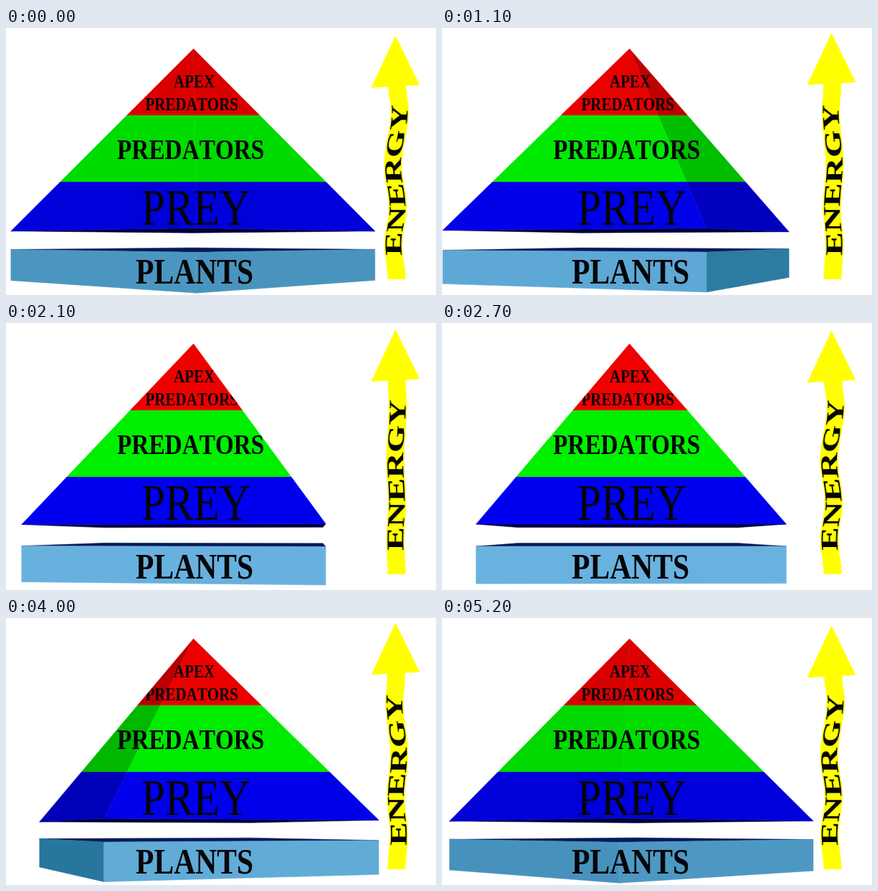
Recreate the animation shown at these times as an HTML page with a canvas. Size 600 px wide and 373 px high, loop 5.3 s.

```html
<!DOCTYPE html>
<html lang="en">
<head>
<meta charset="utf-8">
<title>Energy pyramid</title>
<style>
  html, body { margin: 0; overflow: hidden; background: #fff; }
  canvas { display: block; }
</style>
</head>
<body>
<canvas id="stage" width="600" height="373"></canvas>
<script>
const LOOP = 5300, STEP = 100;
const CX = 261.6, HORIZON = 297, RADIUS = 254, DISTANCE = 1055;
const APEX = [CX, 29];
const BANDS = [[0, 122, [1, 0, 0]], [122, 215, [0, 1, 0]], [215, 373, [0, 0, 1]]];
// Turning points of the arrow shaft's bend: height, offset
const BEND = [[84, 1], [114, 4.5], [192, -5], [250, 1.5], [302, -4.5], [351, 0]];

const ctx = document.getElementById('stage').getContext('2d');
const shaft = document.createElement('canvas');
shaft.width = 600;
shaft.height = 373;

const rgb = parts => `rgb(${parts.map(Math.round)})`;

function fillPolygon(points, colour) {
  const path = new Path2D();
  points.forEach(([x, y]) => path.lineTo(x, y));
  path.closePath();
  ctx.fillStyle = ctx.strokeStyle = colour;
  ctx.lineWidth = 0.5;
  ctx.fill(path);
  ctx.stroke(path);
  return path;
}

function label(c, text, x, y, size, { weight = 'bold', tall = 1.2, angle = 0 } = {}) {
  c.save();
  c.translate(x, y);
  c.rotate(angle);
  c.scale(1, tall);
  c.font = `${weight} ${size}px "Liberation Serif", serif`;
  c.fontKerning = 'none';
  c.fillStyle = '#050508';
  c.fillText(text, 0, 0);
  c.restore();
}

function drawShaft() {
  const c = shaft.getContext('2d');
  c.fillStyle = '#ff0';
  c.fillRect(532.5, 60, 25, 291);
  label(c, 'ENERGY', 556, 318, 49.3, { tall: 0.68, angle: -Math.PI / 2 });
}

// Perspective view of a square's corners at a height below the horizon
function square(turn, height) {
  return [0, 1, 2, 3].map(i => {
    const a = turn + i * Math.PI / 2;
    const zoom = DISTANCE / (DISTANCE - RADIUS * Math.cos(a));
    return [CX + RADIUS * Math.sin(a) * zoom, HORIZON + height * zoom];
  });
}

const facing = (turn, i) => Math.max(0, Math.cos(turn + (i + 0.5) * Math.PI / 2));

function bandFill(light) {
  const level = 255 * (0.5 + 0.66 * light - 0.22 * light * light);
  const fill = ctx.createLinearGradient(0, 0, 0, 373);
  for (const [top, bottom, hue] of BANDS) {
    const colour = rgb(hue.map(v => v * level));
    fill.addColorStop(top / 373, colour);
    fill.addColorStop(bottom / 373, colour);
  }
  return fill;
}

function drawPyramid(turn) {
  const base = square(turn, -13.3);
  const outline = new Path2D();
  fillPolygon(base, '#00003a');
  base.forEach((p, i) => {
    const q = base[(i + 1) % 4];
    const area = (q[0] - APEX[0]) * (p[1] - APEX[1]) - (p[0] - APEX[0]) * (q[1] - APEX[1]);
    if (area > 0) outline.addPath(fillPolygon([APEX, p, q], bandFill(facing(turn, i))));
  });
  ctx.save();
  ctx.clip(outline);
  label(ctx, 'APEX', 234, 83, 21);
  label(ctx, 'PREDATORS', 194.5, 115, 21);
  label(ctx, 'PREDATORS', 155, 182.5, 33.3);
  label(ctx, 'PREY', 189, 274.5, 59.4, { weight: 'normal' });
  ctx.restore();
}

function drawPlants(turn) {
  const top = square(turn, 12.4), bottom = square(turn, 55.6);
  fillPolygon(top, '#041a58');
  top.forEach((p, i) => {
    const j = (i + 1) % 4, light = facing(turn, i);
    if (top[j][0] <= p[0]) return;
    fillPolygon([p, top[j], bottom[j], bottom[i]],
      rgb([105 * light, 80 + 98 * light, 112 + 112 * light]));
  });
  label(ctx, 'PLANTS', 181, 357, 41.6);
}

function bendAt(y) {
  const k = Math.max(1, BEND.findIndex(([end]) => y <= end));
  const [y0, b0] = BEND[k - 1], [y1, b1] = BEND[k];
  const s = Math.min(1, Math.max(0, (y - y0) / (y1 - y0)));
  return b0 + (b1 - b0) * (1 - Math.cos(Math.PI * s)) / 2;
}

function drawArrow(progress) {
  const swing = Math.cos(progress * 4 * Math.PI);
  const bend = 0.15 + 0.85 * swing, lift = 2.1 * swing;
  for (let y = 76; y < 351; y++) {
    ctx.drawImage(shaft, 500, y, 100, 1, 500 + bend * bendAt(y), y, 100, 1);
  }
  fillPolygon([[543.5, 9 + lift], [577, 77.5 + lift], [510, 81 + lift]], '#ff0');
}

function draw(now) {
  const time = Math.floor(now % LOOP / STEP) * STEP;
  const turn = (0.7 + 16.7 * time / 1000) * Math.PI / 180;
  ctx.clearRect(0, 0, 600, 373);
  drawPyramid(turn);
  drawPlants(turn);
  drawArrow(time / LOOP);
}

const start = performance.now();
function tick() {
  draw(performance.now() - start);
  requestAnimationFrame(tick);
}
drawShaft();
tick();
</script>
</body>
</html>
```
